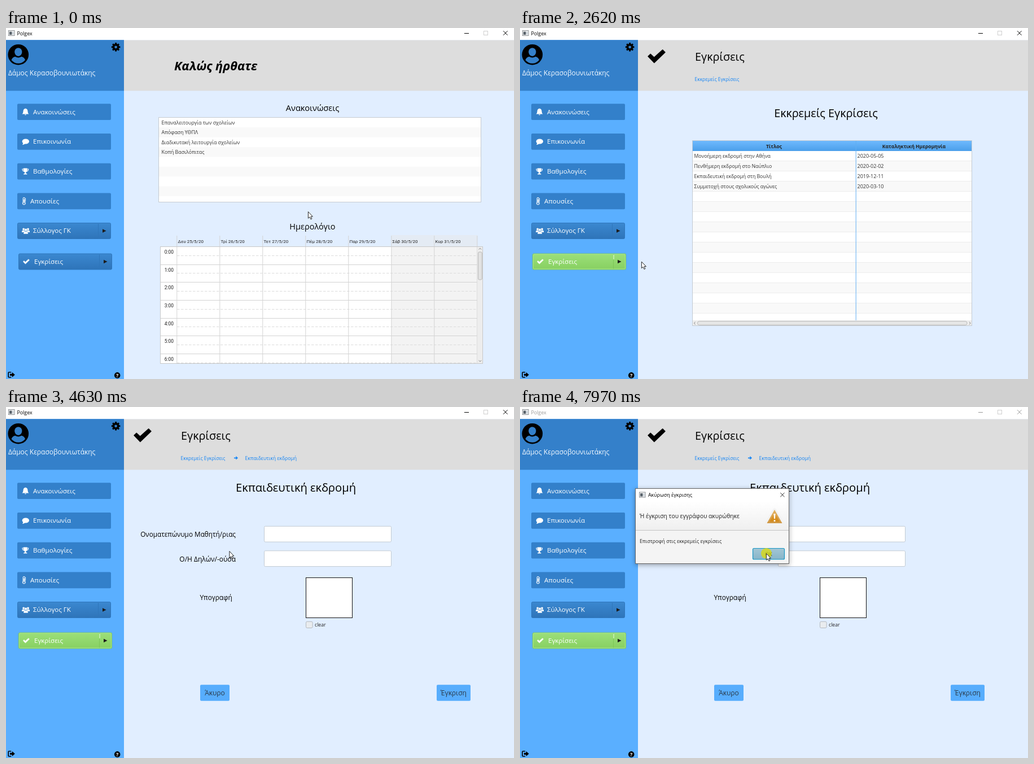
These frames come from a looping animation (900x622 px, 8 s). An HTML page:

```html
<!DOCTYPE html>
<html lang="el">
<head>
<meta charset="utf-8">
<style>
html, body { margin: 0; width: 100%; height: 100%; overflow: hidden; background: #e1eeff; }
svg { display: block; width: 900px; height: 622px; }
text { font-family: "Open Sans", "Noto Sans", sans-serif; white-space: pre; }
.cal text { font-family: Roboto, sans-serif; }
</style>
</head>
<body>
<svg id="stage" viewBox="0 0 900 622" xmlns="http://www.w3.org/2000/svg"></svg>
<script>
const LOOP = 8000;

const rect = (x, y, w, h, fill, extra = '') =>
  `<rect x="${x}" y="${y}" width="${w}" height="${h}" fill="${fill}" ${extra}/>`;
const line = (x1, y1, x2, y2, stroke, extra = '') =>
  `<path d="M${x1} ${y1}L${x2} ${y2}" stroke="${stroke}" fill="none" ${extra}/>`;
const path = (d, fill, extra = '') => `<path d="${d}" fill="${fill}" ${extra}/>`;
const circle = (x, y, r, fill, extra = '') =>
  `<circle cx="${x}" cy="${y}" r="${r}" fill="${fill}" ${extra}/>`;
const text = (x, y, size, s, fill = '#000', extra = '') =>
  `<text x="${x}" y="${y}" font-size="${size}" fill="${fill}" ${extra}>${s}</text>`;
const group = (id, body, extra = '') => `<g id="${id}" ${extra}>${body}</g>`;
const times = (n, f) => Array.from({ length: n }, (_, i) => f(i)).join('');
const grad = (id, a, b) =>
  `<linearGradient id="${id}" x2="0" y2="1"><stop stop-color="${a}"/><stop offset="1" stop-color="${b}"/></linearGradient>`;
const MID = 'text-anchor="middle"', END = 'text-anchor="end"';

const CHECK = 'M1 12.3L5.2 8.2L11.6 14.2L26.6 .8L31 5L11.8 23.6Z';
const check = (x, y, k, fill) =>
  path(CHECK, fill, `stroke="${fill}" stroke-width="1.4" stroke-linejoin="round" transform="translate(${x} ${y}) scale(${k})"`);

const defs = `<defs>
  ${grad('blueBtn', '#3b88d0', '#2e74b9')}${grad('greenBtn', '#9cdf79', '#87d061')}
  ${grad('hot', '#ffffff', '#e9e9e9')}${grad('head', '#70bbff', '#4b9fea')}
  ${grad('plain', '#ffffff', '#efefef')}${grad('ok', '#b5d9e8', '#8cc1d8')}
  ${grad('okHot', '#c4e2ee', '#9dcce0')}${grad('okDown', '#a3c6d5', '#87b5c9')}
  ${grad('warn', '#e8a840', '#cf8415')}
  <filter id="shade" x="-10%" y="-20%" width="120%" height="145%">
    <feDropShadow dx="0" dy="2" stdDeviation="4" flood-opacity=".35"/></filter>
</defs>`;

const appIcon = (x, y) => rect(x, y, 10.5, 9, '#f4f4f4', 'stroke="#8a8f94"') +
  rect(x + 1.5, y + 2, 4.5, 5.5, '#59636b') + rect(x + 6.8, y + 2, 2.4, 5.5, '#cfd8de');

function titleBar() {
  return rect(0, 0, 900, 21.3, '#fff') + appIcon(4.5, 4.5) +
    group('caption', text(19.5, 13, 8.8, 'Polgex', 'currentColor') +
      line(812, 9.5, 820, 9.5, 'currentColor') +
      line(881, 5.2, 888.6, 12.8, 'currentColor') + line(888.6, 5.2, 881, 12.8, 'currentColor')) +
    rect(846.5, 5.5, 7, 7, 'none', 'stroke="#cfcfcf"');
}

function gear(x, y) {
  return circle(x, y, 4.2, 'none', 'stroke="#000" stroke-width="3.6"') +
    times(8, i => rect(-1.5, -7.8, 3, 3, '#000', `rx=".6" transform="translate(${x} ${y}) rotate(${i * 45})"`));
}

function splitButton(x, y, fill, edge, label, extra = '') {
  return rect(x + .5, y + .5, 165, 28, `url(#${fill})`, `rx="2" stroke="${edge}"`) + extra +
    line(x + 143.5, y + 2, x + 143.5, y + 27, edge) +
    path(`M${x + 151} ${y + 11.2}v6.6l6.5-3.3z`, '#1c1c1c') +
    text(x + 28, y + 18.3, 11.5, label, '#fff');
}

const person = (x, y, k) => `<g transform="translate(${x} ${y}) scale(${k})">` +
  circle(0, -2.6, 2.4, '#fff') + path('M-4 4.6Q-4.2 .2-1.6 0H1.6Q4.2 .2 4 4.6Z', '#fff') + '</g>';

function sidebar() {
  const labels = ['Ανακοινώσεις', 'Επικοινωνία', 'Βαθμολογίες', 'Απουσίες'];
  const icons =
    path('M34.5 142.5q4 .8 4 5.5 0 3 2 4.4H28.5q2-1.4 2-4.4 0-4.7 4-5.5zM33 153.2h3q-.3 1.4-1.5 1.4t-1.5-1.4z', '#fff') +
    '<ellipse cx="34.8" cy="201" rx="6.2" ry="4.6" fill="#fff"/>' + path('M30.4 203q0 2.8-1.4 4 3 0 4.8-1.9z', '#fff') +
    path('M31 248.6h6.6v3.6q-.5 3-2.4 3.6v1.6q2.3.2 2.4 2H31q.1-1.8 2.4-2v-1.6q-1.9-.6-2.4-3.6z', '#fff') +
    path('M31 250h-2q0 3.6 3 4M37.6 250h2q0 3.6-3 4', 'none', 'stroke="#fff" stroke-width="1.1"') +
    path('M30.2 308.6v-6.4a1.7 1.7 0 0 1 3.4 0v6.4a2.5 2.5 0 1 1-3.4 0z', 'none', 'stroke="#fff" stroke-width="1.1"') +
    line(31.9, 303.5, 31.9, 310.5, '#fff', 'stroke-width="1.4"') + line(34.8, 302, 34.8, 308, '#fff', 'stroke-dasharray="1 1"');
  const users = person(31.2, 358.4, .78) + person(39, 358.4, .78) +
    `<g stroke="#3480ca" stroke-width=".5">${person(35.1, 360.4, 1.02)}</g>`;
  return rect(0, 21.3, 209, 601, '#5aafff') + rect(0, 21.3, 209, 90, '#3480ca') +
    circle(21.8, 47.2, 18.3, '#000') +
    '<ellipse cx="21.8" cy="42.6" rx="6.6" ry="7.4" fill="#3480ca"/>' +
    path('M9.6 56.8q1.6-5 6.6-6q5.6 3.6 11.2 0q5 1 6.6 6a15.6 15.6 0 0 1-24.4 0z', '#3480ca') +
    text(4, 83.6, 12, 'Δάμος Κερασοβουνιωτάκης', '#f2f8ff') + gear(194.6, 33.8) +
    labels.map((s, i) => rect(20, 134.3 + i * 52.7, 166, 28.8, '#3380ca', 'rx="2"') +
      text(i === 3 ? 43 : 48, 152.5 + i * 52.7, 11.6, s, '#fff')).join('') + icons +
    splitButton(20, 345, 'blueBtn', '#2f76bb', 'Σύλλογος ΓΚ') + users +
    group('idleBtn', splitButton(22, 399.5, 'blueBtn', '#2f76bb', 'Εγκρίσεις')) +
    group('focusBtn', rect(23.5, 401, 163, 26, 'none', 'rx="1.5" stroke="#1497d2"')) +
    group('hotArrow', rect(166, 400.5, 21.5, 27, 'url(#hot)') + path('M173.6 410.5v6.6l6.2-3.3z', '#555')) +
    group('greenBtnOn', splitButton(22, 399.5, 'greenBtn', '#7cc657', 'Εγκρίσεις',
      rect(23.5, 401, 163, 26, 'none', 'rx="1" stroke="#a9e78a"')) +
      line(166, 402, 166, 410, '#d3f5c0', 'stroke-width="1.5"')) +
    check(30, 409.4, .37, '#fff') +
    path('M9.2 610H5.2q-1 0-1 1v7q0 1 1 1H9.2', 'none', 'stroke="#000" stroke-width="1.6"') +
    path('M7 612.8h3.8v-2.8l5 4.5-5 4.5v-2.8H7z', '#000') +
    circle(197.2, 615.4, 5.3, '#000') + text(197.2, 618.6, 9, '?', '#fff', MID + ' font-weight="bold"');
}

function calendar() {
  const days = ['Δευ 25', 'Τρί 26', 'Τετ 27', 'Πέμ 28', 'Παρ 29', 'Σάβ 30', 'Κυρ 31'];
  const col = 76, hour = i => Math.round(387 + i * 31.65) + .5;
  return rect(683, 367, 152, 20.5, '#e4ebf4') + rect(273, 387.5, 562, 207, '#fff') +
    rect(683, 387.5, 152, 207, '#f3f3f3') +
    times(7, i => line(303, hour(i + .5), 835, hour(i + .5), '#dcdcdc', 'stroke-dasharray="4.5 2.5"')) +
    times(7, i => line(273, hour(i), 835, hour(i), '#d3d3d3') +
      text(297, hour(i) + 12.5, 8.4, i + ':00', '#222', END)) +
    times(8, i => line(302.8 + i * col, 368, 302.8 + i * col, 594, '#d3d3d3')) +
    days.map((d, i) => text(304.5 + i * col, 381, 8, d + '/5/20', '#222')).join('') +
    rect(835, 387.5, 9.5, 207, '#ededed') +
    rect(836.5, 397, 6.8, 49, '#e2e2e2', 'rx="2" stroke="#b9b9b9"') +
    path('M837.5 392.4l2.4-2 2.4 2M837.5 589l2.4 2 2.4-2', 'none', 'stroke="#888"') +
    rect(273.5, 387.5, 571, 207, 'none', 'stroke="#c8c8c8"');
}

function home() {
  const news = ['Επαναλειτουργία των σχολείων', 'Απόφαση ΥΘΠΛ', 'Διαδικυτακή λειτουργία σχολείων', 'Κοπή Βασιλόπιτας'];
  return text(298, 75, 21.8, 'Καλώς ήρθατε', '#000', 'font-weight="bold" font-style="italic"') +
    text(543, 146.5, 14.7, 'Ανακοινώσεις', '#000', MID) + rect(270, 158.5, 572, 150, '#fff') +
    times(4, i => rect(270, 176.2 + i * 34.8, 572, 17.4, '#f9f9f9')) +
    rect(270.5, 158.5, 571, 150, 'none', 'stroke="#c6cbd1"') +
    news.map((s, i) => text(275.5, 171 + i * 17.4, 8.8, s, '#333')).join('') +
    text(543, 357.3, 14.5, 'Ημερολόγιο', '#000', MID) + `<g class="cal">${calendar()}</g>`;
}

function list() {
  const rows = [['Μονοήμερη εκδρομή στην Αθήνα', '2020-05-05'], ['Πενθήμερη εκδρομή στο Ναύπλιο', '2020-02-02'],
    ['Εκπαιδευτική εκδρομή στη Βουλή', '2019-12-11'], ['Συμμετοχή στους σχολικούς αγώνες', '2020-03-10']];
  const row = (i, fill) => text(308.5, 230 + i * 18, 8.7, rows[i][0], fill) + text(597.5, 230 + i * 18, 9, rows[i][1], fill);
  return text(542, 157.5, 19.8, 'Εκκρεμείς Εγκρίσεις', '#000', MID) + rect(305, 199, 496, 329, '#fff') +
    times(8, i => rect(305, 236 + i * 36, 496, 18, '#f9f9f9')) +
    times(17, i => line(305, 235.5 + i * 18, 801, 235.5 + i * 18, '#ededed')) +
    rect(305, 199, 496, 19, 'url(#head)') +
    text(450, 212.7, 8.7, 'Τίτλος', '#222', MID + ' font-weight="bold"') +
    text(698, 212.7, 8.6, 'Καταληκτική Ημερομηνία', '#222', MID + ' font-weight="bold"') +
    times(4, i => row(i, '#333')) +
    group('picked', rect(305, 254, 496, 18, '#0096c9') + row(2, '#fff')) +
    line(595.2, 199, 595.2, 518, '#62aef2') +
    rect(305, 518, 496, 10, '#ededed') + rect(314.5, 519.7, 477.5, 6.6, '#e6e6e6', 'rx="3" stroke="#b9b9b9"') +
    path('M310.5 520.7l-2 2.4 2 2.4M796 520.7l2 2.4-2 2.4', 'none', 'stroke="#888"') +
    rect(305.5, 199.5, 495, 328, 'none', 'stroke="#c3cbd3"') +
    group('ring', rect(305.2, 199, 496, 329, 'none', 'stroke="#1399c8" stroke-width="1.5"'));
}

function form() {
  const field = y => rect(457.5, y, 225, 27.8, '#fff', 'rx="2" stroke="#c2cad3"');
  const button = (x, w, s) => rect(x, 492.2, w, 28.6, '#57adfd', 'rx="2"') + text(x + w / 2, 511, 12, s, '#2b3a48', MID);
  return path('M404 89.4h3.4v-2.3l3.6 3.2-3.6 3.2v-2.3H404z', '#1585f5') +
    text(423.5, 93.6, 8.7, 'Εκπαιδευτική εκδρομή', '#1585f5') +
    text(513.5, 150, 20.2, 'Εκπαιδευτική εκδρομή', '#000', MID) +
    text(407, 230.2, 11.75, 'Ονοματεπώνυμο Μαθητή/ριας', '#000', END) + field(211.3) +
    text(407, 273.8, 12, 'Ο/Η Δηλών/-ούσα', '#000', END) + field(254.8) +
    text(343.5, 341.8, 11.8, 'Υπογραφή') +
    rect(531.5, 302.5, 82, 71, '#fff', 'stroke="#222" stroke-width="1.1"') +
    rect(531.5, 380.3, 11.6, 11.2, '#e9ecef', 'rx="2" stroke="#b3b8be"') + text(547, 389, 8.7, 'clear', '#222') +
    button(344, 52, 'Άκυρο') + button(763, 60, 'Έγκριση');
}

function dialog() {
  const ok = (id, fill) => group(id, rect(412.5, 250.5, 56, 19.5, `url(#${fill})`, 'rx="2" stroke="#1797c6" stroke-width="1.2"'));
  return rect(204.5, 144.5, 272, 133, '#f4f4f4', 'stroke="#666" filter="url(#shade)"') +
    rect(205, 145, 271, 22, '#fff') + rect(205, 167, 271, 51, 'url(#plain)') +
    line(205, 218.5, 476, 218.5, '#c4c4c4') + appIcon(211.5, 151) +
    text(227, 159, 8.9, 'Ακύρωση έγκρισης') +
    path('M461.3 152l7.2 7.2M468.5 152l-7.2 7.2', 'none', 'stroke="#222"') +
    text(212, 197, 10.3, 'Ή έγκριση του εγγράφου ακυρώθηκε', '#222') +
    path('M451 182l13.6 24H437.4z', 'url(#warn)', 'stroke="#fff" stroke-width="4.4" stroke-linejoin="round" paint-order="stroke"') +
    path('M451 182l13.6 24H437.4z', 'none', 'stroke="#d4d4d4" stroke-width="5.4" stroke-linejoin="round" opacity=".25"') +
    path('M449.4 189h3.2l-.6 9h-2z', '#fff') + circle(451, 201.6, 1.5, '#fff') +
    text(212, 240.5, 8.7, 'Επιστροφή στις εκκρεμείς εγκρίσεις', '#222') +
    ok('okIdle', 'ok') + ok('okHover', 'okHot') + ok('okPress', 'okDown') +
    text(440.5, 263.6, 8.8, 'OK', '#333', MID);
}

function popup() {
  return rect(188.5, 400, 111, 42.5, '#f4f4f4', 'stroke="#bdbdbd" filter="url(#shade)"') +
    rect(189, 403, 110, 18, '#0096c9') + text(197, 415.2, 8.7, 'Εκκρεμείς Εγκρίσεις', '#fff') +
    text(197, 433.2, 8.7, 'Ιστορικό Εγκρίσεων', '#333');
}

const ARROW = 'M.4 .6V12.2L3 9.8L5 14L6.9 13.1L5 9.1H8.4Z';
const HAND = 'M-1.5 9V1.5a1.5 1.5 0 0 1 3 0V6.2q1.4-1 2.4.4 1.3-.8 2.2.5 1.9-.4 1.9 1.4V12q0 2-1.2 3.6V17.4H0V16L-4.2 10.8q-.8-1.5.6-1.9 1-.1 2.1 1.6z';
const pointer = (id, d) => group(id, path(d, '#fff', 'stroke="#111" stroke-width=".9" stroke-linejoin="round"'));

document.getElementById('stage').innerHTML = defs + rect(209, 21, 691, 601, '#e1eeff') +
  rect(209, 21.3, 691, 90, '#ddd') + titleBar() + sidebar() + group('home', home()) +
  group('head2', check(226, 38, 1, '#000') + text(310, 57.8, 19.8, 'Εγκρίσεις') +
    text(309.5, 93.6, 8.5, 'Εκκρεμείς Εγκρίσεις', '#1585f5')) +
  group('list', list()) + group('form', form()) + group('dialog', dialog()) + group('popup', popup()) +
  group('cursor', group('click', circle(.5, .5, 9.5, '#e0dc00', 'opacity=".72"')) + pointer('arrow', ARROW) + pointer('hand', HAND));

// Visible spans in ms, as [from, to] pairs.
const SPANS = {
  home: [[0, 2620]], head2: [[2620, LOOP]], list: [[2620, 4320]], form: [[4320, LOOP]],
  idleBtn: [[0, 2620]], greenBtnOn: [[2620, LOOP]], focusBtn: [[1530, 2620]], hotArrow: [[1210, 2620]],
  popup: [[1600, 2400]], picked: [[4080, 4320]], ring: [[4080, 4320]], dialog: [[6400, LOOP]],
  okIdle: [[0, 7740]], okHover: [[7740, 7970]], okPress: [[7970, LOOP]],
  click: [[1530, 1600], [2320, 2400], [4080, 4170], [6320, 6400], [7970, LOOP]],
  hand: [[1210, 1840], [6010, 6550]]
};

// Pointer moves: first and last step time, step count, then [step, x, y] stops.
const MOVES = [
  [590, 1360, 11, [0, 535, 325], [2, 520, 316], [4, 415, 340], [6, 288, 386], [8, 203, 409], [9, 187.5, 411], [11, 180.5, 419]],
  [1770, 2150, 6, [0, 180.5, 419], [2, 195, 416], [4, 211, 414], [6, 215, 413.5]],
  [2930, 3700, 11, [0, 215, 413.5], [2, 232, 400], [6, 330, 310], [9, 388, 268], [11, 386, 264]],
  [4630, 5400, 11, [0, 386, 264], [2, 405, 246], [6, 560, 160], [8, 635, 131], [11, 655, 145]],
  [5480, 6090, 9, [0, 655, 145], [1, 661, 158], [3, 540, 280], [5, 395, 405], [6, 372, 427], [8, 377, 485], [9, 381, 499]],
  [6790, 7580, 11, [0, 381, 499], [1, 392, 480], [4, 335, 340], [7, 273, 215], [8, 278, 201], [11, 351, 246]],
  [7660, 7820, 3, [0, 351, 246], [1, 395, 254], [2, 426, 258], [3, 436, 259]]
];

function pointerAt(t) {
  let pos = [535, 325];
  for (const [from, to, n, ...stops] of MOVES) {
    if (t < from) break;
    const k = Math.min(n, Math.floor((t - from) / (to - from) * (n - 1) + .01) + 1);
    const i = Math.max(1, stops.findIndex(s => s[0] >= k));
    const [a, b] = [stops[i - 1], stops[i]];
    const f = (k - a[0]) / (b[0] - a[0]);
    pos = [a[1] + (b[1] - a[1]) * f, a[2] + (b[2] - a[2]) * f];
  }
  return pos;
}

const el = id => document.getElementById(id);
const nodes = Object.keys(SPANS).map(id => [el(id), SPANS[id]]);
const within = (t, spans) => spans.some(([a, b]) => t >= a && t < b);
const cursor = el('cursor'), arrow = el('arrow'), caption = el('caption');
const start = performance.now();

function draw() {
  const t = (performance.now() - start) % LOOP;
  for (const [node, spans] of nodes) node.style.display = within(t, spans) ? '' : 'none';
  arrow.style.display = within(t, SPANS.hand) ? 'none' : '';
  caption.style.color = t >= 6400 ? '#999' : '#000';
  cursor.setAttribute('transform', `translate(${pointerAt(t).join(' ')})`);
  requestAnimationFrame(draw);
}
draw();
</script>
</body>
</html>
```
